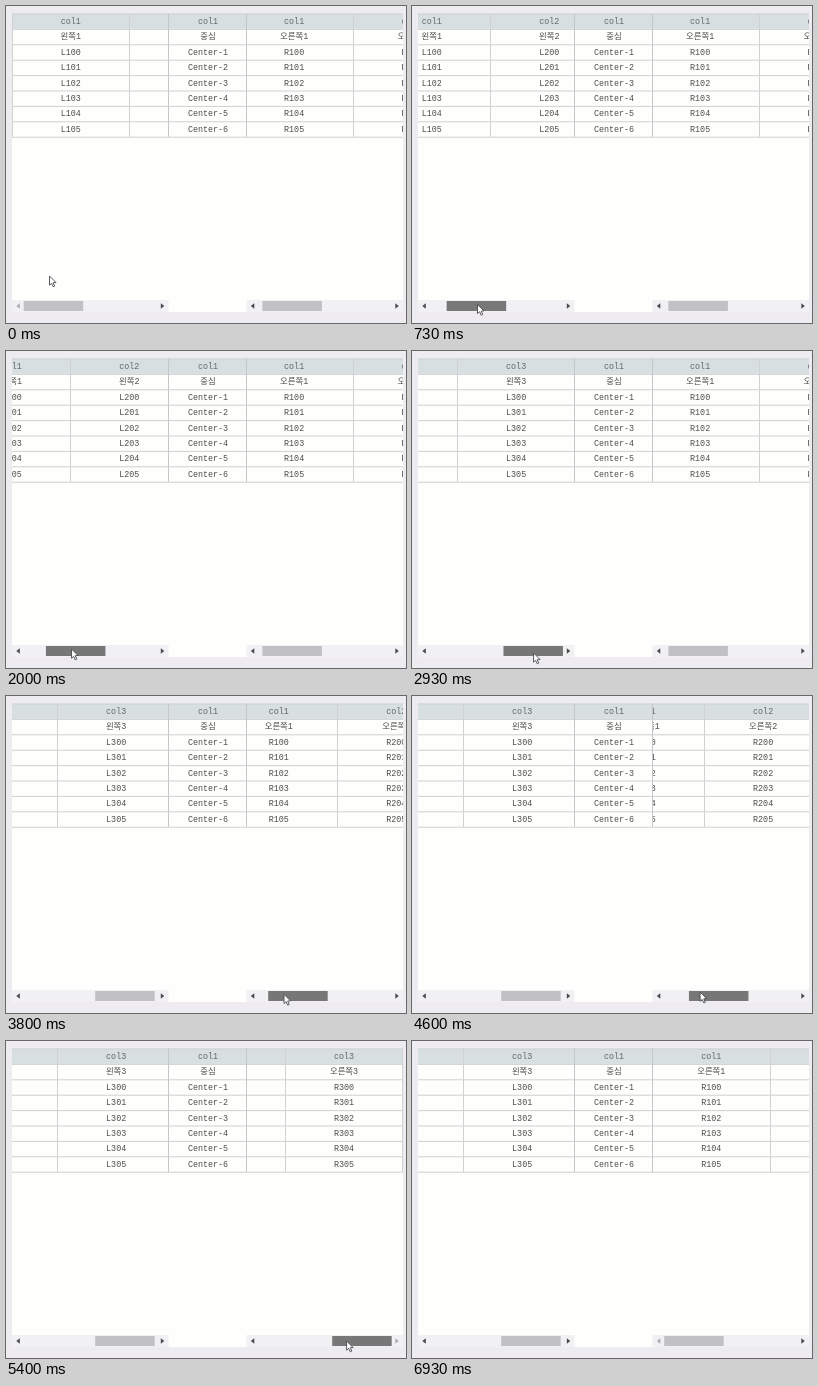
Animation, 400 px wide and 317 px high, one loop 7000 ms. Source, as an HTML page with a canvas:

```html
<!DOCTYPE html>
<html lang="ko">
<head>
<meta charset="utf-8">
<title>Split grid scrolling</title>
<style>
html, body { margin: 0; width: 100%; height: 100%; overflow: hidden; background: #eeecf0; }
canvas { display: block; }
</style>
</head>
<body>
<canvas id="stage" width="400" height="317"></canvas>
<script>
const ctx = document.getElementById('stage').getContext('2d');
const LOOP = 7000, FPS = 15;
const TOP = 7.5, ROW = 15.4, ROWS = 8, COL = 117.5, PANE_W = 156;
const TRAVEL = 74, MAX = 3 * COL - PANE_W - 0.25, LAG = 20;
const LINE = '#cfd2d1', DIVIDER = '#c3c7c7';

// Turning points of the hand: [time, x]
const hand = [
  [0, 43.5], [467, 46], [1400, 144.5], [2200, 50.9], [3133, 131], [3267, 117.5], [3600, 270.2],
  [3667, 270.2], [4233, 326], [4800, 273], [5367, 341.5], [5880, 264]
];
const MOUSE_GONE = 6400;

// zero: hand position at which the pane is scrolled fully left
const panes = [
  { x: 6, name: '왼쪽', letter: 'L', zero: 46, press: 467, release: 3267, enter: 400, leave: 3300 },
  { x: 240.5, name: '오른쪽', letter: 'R', zero: 266, press: 3667, release: 6000, enter: 3570, leave: MOUSE_GONE }
];

const clamp = (v, lo, hi) => Math.min(hi, Math.max(lo, v));
const smooth = p => p * p * (3 - 2 * p);
const rowY = i => TOP + i * ROW;

function handX(t) {
  const k = hand.findIndex(key => t < key[0]);
  if (k < 0) return hand[hand.length - 1][1];
  const [t0, a] = hand[k - 1], [t1, b] = hand[k];
  return a + (b - a) * smooth((t - t0) / (t1 - t0));
}

function handY(t) {
  const drift = 299 - 3 * Math.cos((t - 1400) / 3060 * 2 * Math.PI);
  return 270 + (drift - 270) * smooth(clamp((t - 70) / 330, 0, 1));
}

// The thumb follows the hand with a short lag while it is held.
function scrollAt(pane, t) {
  const x = handX(clamp(t - LAG, pane.press, pane.release));
  return clamp((x - pane.zero) / TRAVEL, 0, 1) * MAX;
}

function box(x, y, w, h, color) {
  ctx.fillStyle = color;
  ctx.fillRect(x, y, w, h);
}

function column(cx, cells) {
  cells.forEach((s, i) => {
    ctx.fillStyle = i ? '#4c4c4c' : '#626869';
    ctx.fillText(s, cx, rowY(i + 0.5) + 0.5);
  });
}

function cells(head, title, prefix, first) {
  return [head, title, ...Array.from({ length: 6 }, (_, i) => prefix + (first + i))];
}

function arrow(x, dir, off) {
  ctx.fillStyle = off ? '#acacae' : '#4a4a4c';
  ctx.beginPath();
  ctx.moveTo(x + dir * 2, 300);
  ctx.lineTo(x - dir * 1.5, 297.2);
  ctx.lineTo(x - dir * 1.5, 302.8);
  ctx.fill();
}

function drawGrid({ x, name, letter }, scroll) {
  ctx.save();
  ctx.beginPath();
  ctx.rect(Math.ceil(x), TOP, PANE_W, ROWS * ROW + 1);
  ctx.clip();
  for (let n = 0; n <= 3; n++) {
    const left = x + n * COL - scroll;
    box(Math.round(left - 0.3), TOP, 1, ROWS * ROW, LINE);
    if (n < 3) column(left + COL / 2, cells('col' + (n + 1), name + (n + 1), letter, (n + 1) * 100));
  }
  ctx.restore();
}

function drawBar({ x, press, release, enter, leave }, scroll, t) {
  const held = t >= press && t < release, over = t >= enter && t < leave;
  box(x, 294, PANE_W + 0.5, 12, '#f1f0f2');
  arrow(x + 6.3, -1, scroll < 0.5);
  arrow(x + PANE_W - 5.7, 1, scroll > MAX - 0.5);
  box(x + 11.7 + scroll / MAX * TRAVEL, 295, 59.5, 10, held ? '#777' : over ? '#a8a8a8' : '#c1c0c2');
}

function drawMouse(x, y) {
  ctx.save();
  ctx.translate(x, y);
  ctx.beginPath();
  [[0, 0], [0, 9.2], [2.1, 7.3], [3.7, 10.8], [5.2, 10.1], [3.7, 6.7], [6.5, 6.5]]
    .forEach(p => ctx.lineTo(...p));
  ctx.closePath();
  ctx.fillStyle = '#fff';
  ctx.fill();
  ctx.strokeStyle = '#4a4a4c';
  ctx.lineWidth = 0.9;
  ctx.stroke();
  ctx.restore();
}

function draw(t) {
  ctx.font = '8.4px "Liberation Mono", "Noto Sans CJK KR", "Noto Sans CJK", monospace';
  ctx.textAlign = 'center';
  ctx.textBaseline = 'middle';

  box(0, 0, 400, 317, '#eeecf0');
  box(6, TOP, 391, 306 - TOP, '#fefefc');
  box(6, TOP, 391, ROW, '#d8dfe0');
  for (let i = 0; i <= ROWS; i++) box(6, rowY(i), 391, 1, LINE);

  for (const pane of panes) {
    const scroll = scrollAt(pane, t);
    drawGrid(pane, scroll);
    drawBar(pane, scroll, t);
  }
  column(202, cells('col1', '중심', 'Center-', 1));
  for (const x of [162, 240]) box(x, TOP, 1, ROWS * ROW, DIVIDER);
  if (t < MOUSE_GONE) drawMouse(handX(t), handY(t));
}

const start = performance.now();
function tick() {
  const t = (performance.now() - start) % LOOP;
  const step = Math.floor((t + 5) * FPS / 1000) % (LOOP * FPS / 1000);
  draw(step * 1000 / FPS);
  requestAnimationFrame(tick);
}
tick();
</script>
</body>
</html>
```
